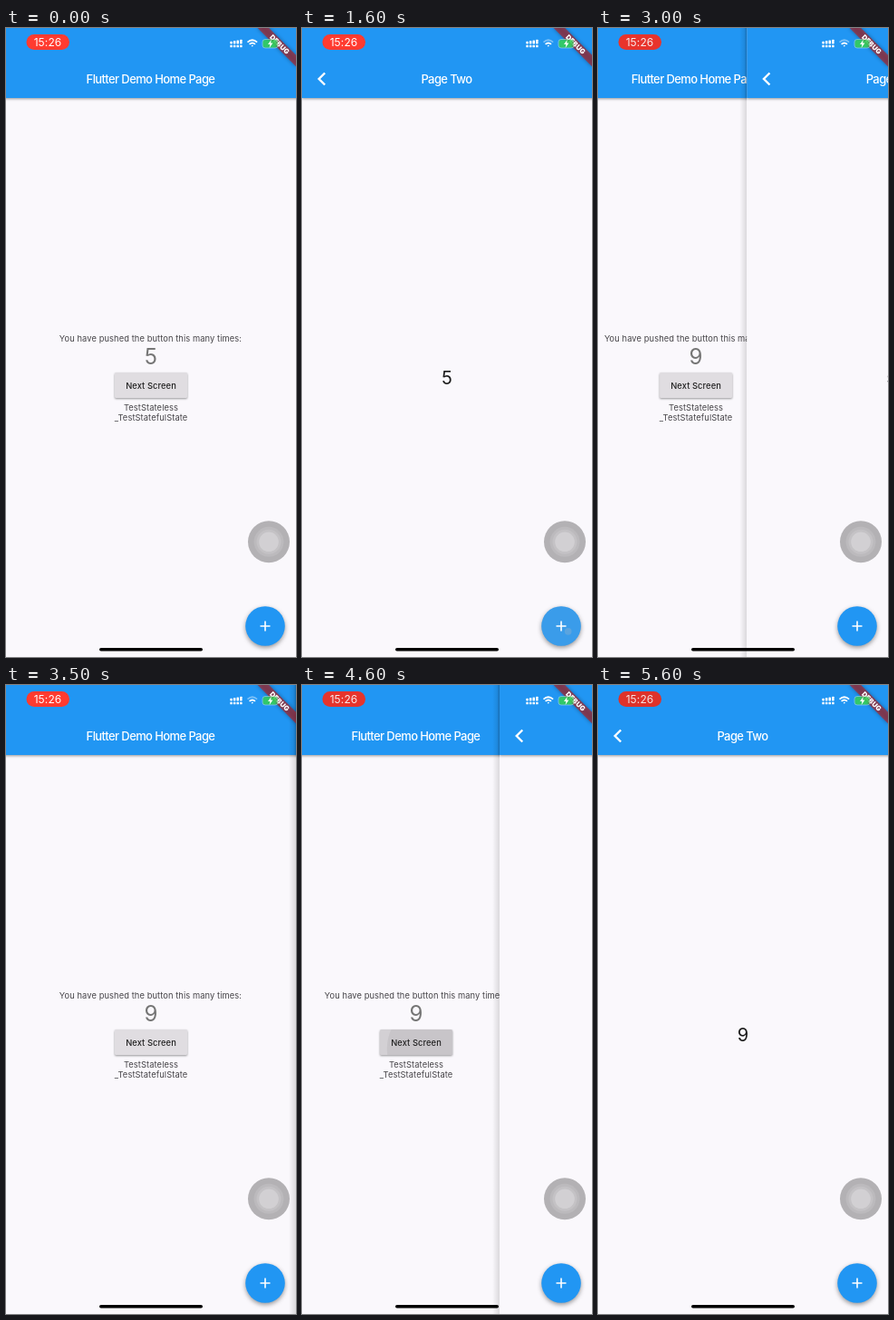
Recreate the animation shown at these times as an HTML page. Size 320 px wide and 692 px high, loop 5.7 s.

```html
<!DOCTYPE html>
<html lang="en">
<head>
<meta charset="utf-8">
<title>Counter demo</title>
<style>
html, body { margin: 0; width: 100%; height: 100%; overflow: hidden; background: #faf8fc; }
svg { display: block; width: 100vw; height: 100vh; }
text { font: 400 9.3px Inter, Roboto, sans-serif; letter-spacing: .1px; fill: #464448; text-anchor: middle; }
text.title { font-size: 13px; font-weight: 500; letter-spacing: -.6px; fill: #fff; }
text.label { font-weight: 500; fill: #222; }
text.count { font-size: 24px; fill: #757575; }
text.big { font-size: 20px; fill: #1a1a1a; }
text.clock { font-size: 12px; }
text.debug { font-size: 7.6px; font-weight: 900; fill: #fff; }
.bar { fill: #2196f3; filter: drop-shadow(0 1.5px 1.5px #0006); }
.button { fill: #e0dde1; filter: drop-shadow(0 1.2px 1px #0006); }
.fab { fill: #2196f3; filter: drop-shadow(0 2.5px 2.5px #0006); }
.banner { fill: #b71c1ca0; filter: drop-shadow(0 0 2px #0008); }
.line { fill: none; stroke: #fff; }
</style>
</head>
<body>
<svg viewBox="0 0 320 692">
  <defs>
    <clipPath id="fabClip"><circle cx="286" cy="658" r="21.8"/></clipPath>
    <clipPath id="buttonClip"><rect x="120" y="379" width="80" height="28" rx="1.5"/></clipPath>
    <linearGradient id="edge"><stop stop-color="#000" stop-opacity="0"/><stop offset="1" stop-color="#000" stop-opacity=".13"/></linearGradient>
  </defs>

  <g id="home">
    <rect width="320" height="692" fill="#faf8fc"/>
    <rect class="bar" x="-10" y="-10" width="340" height="87"/>
    <text class="title" x="159.5" y="61">Flutter Demo Home Page</text>
    <text x="159.5" y="344.5">You have pushed the button this many times:</text>
    <text class="count" id="count" x="160" y="370">5</text>
    <rect class="button" x="120" y="379" width="80" height="28" rx="1.5"/>
    <g id="ink" clip-path="url(#buttonClip)">
      <rect x="120" y="379" width="80" height="28" fill="#000" opacity=".06"/>
      <circle id="inkSpot" cx="178" cy="400" opacity=".05"/>
    </g>
    <text class="label" x="160" y="396.5">Next Screen</text>
    <text x="160" y="420.8">TestStateless</text>
    <text x="160" y="432.3">_TestStatefulState</text>
  </g>

  <g id="second">
    <rect x="-8" width="8" height="692" fill="url(#edge)"/>
    <rect width="320" height="692" fill="#faf8fc"/>
    <rect class="bar" width="330" y="-10" height="87"/>
    <path class="line" d="M25.2 49.5 18.7 56l6.5 6.5" stroke-width="2.4"/>
    <text class="title" x="159.5" y="61">Page Two</text>
    <text class="big" id="shown" x="160" y="392">5</text>
  </g>

  <circle class="fab" cx="286" cy="658" r="21.8"/>
  <g id="splashes" clip-path="url(#fabClip)"></g>
  <path class="line" d="M280.5 658h11M286 652.5v11" stroke-width="1.6"/>

  <g transform="translate(320 0) rotate(45)">
    <rect class="banner" x="-30" y="21" width="60" height="9"/>
    <text class="debug" y="28.2">DEBUG</text>
  </g>

  <rect id="pill" x="22.5" y="7" width="47.5" height="17" rx="8.5"/>
  <text class="clock" id="clock" x="46" y="19.5">15:26</text>
  <g id="signal" fill="#fff"></g>
  <g class="line" stroke-width="1.8">
    <path id="wifiOuter" d="M266.5 15.6q5.3-4.6 10.6 0"/>
    <path d="M268.6 17.9q3.2-2.7 6.4 0"/>
    <path d="M270.6 18.9h2.4l-1.2 1.9z" fill="#fff" stroke="none"/>
  </g>
  <rect x="283" y="12.5" width="17" height="9.5" rx="3" fill="#34c759" fill-opacity=".65" stroke="#fff" stroke-opacity=".35"/>
  <rect x="284" y="13.5" width="14" height="7.5" rx="2" fill="#34d058" fill-opacity=".7"/>
  <path d="M292.8 12.8 289 18h2.4l-.8 4 3.8-5.4H292z" fill="#fff"/>

  <circle cx="290" cy="565.3" r="23" fill="#b3b1b4"/>
  <circle cx="290" cy="565.3" r="16.5" fill="#bcbabd"/>
  <circle cx="290" cy="565.3" r="13.5" fill="#c4c2c5"/>
  <circle cx="290" cy="565.3" r="10.8" fill="#d2d0d3"/>
  <rect x="103" y="682" width="114" height="3.6" rx="1.8"/>
</svg>
<script>
const LOOP = 5700, STEP = 100, SLIDE = 500;
const PUSHES = [200, 4539], POP = 2900;
const TAPS = [1190, 1590, 1880, 2160];
const $ = id => document.getElementById(id);
const clamp = v => Math.max(0, Math.min(1, v));
const mix = (a, b, k) => `rgb(${a.map((v, i) => v + (b[i] - v) * k)})`;

const bezier = (a, b, s) => 3 * (1 - s) ** 2 * s * a + 3 * (1 - s) * s * s * b + s ** 3;

// cubic-bezier(.35, .91, .33, .97)
function ease(x) {
  let lo = 0, hi = 1;
  for (let i = 0; i < 24; i++) {
    const mid = (lo + hi) / 2;
    if (bezier(.35, .33, mid) < x) lo = mid; else hi = mid;
  }
  return bezier(.91, .97, lo);
}

const slide = (t, start) => ease(clamp((t - start) / SLIDE));

// How far the second page covers the first, 0 to 1
function cover(t) {
  if (t >= PUSHES[1]) return slide(t, PUSHES[1]);
  return t >= POP ? 1 - slide(t, POP) : slide(t, PUSHES[0]);
}

function splash(age) {
  if (age < 0 || age > 420) return '';
  const grow = clamp(age / 250), fade = 1 - clamp((age - 150) / 250);
  const x = 294 - 8 * grow, y = 664 - 6 * grow;
  return `<circle cx="286" cy="658" r="22" fill="#bcbcbc" opacity="${.16 * fade}"/>
    <circle cx="${x}" cy="${y}" r="${3 + 22 * grow}" fill="#bcbcbc" opacity="${.25 * fade}"/>`;
}

function draw(t) {
  const c = cover(t);
  $('home').setAttribute('transform', `translate(${-320 / 3 * c})`);
  $('second').setAttribute('transform', `translate(${320 * (1 - c)})`);
  $('second').style.display = c > 0 ? '' : 'none';

  $('count').textContent = 5 + TAPS.filter(tap => t >= tap).length;
  $('shown').textContent = t < PUSHES[1] ? 5 : 9;
  $('splashes').innerHTML = TAPS.map(tap => splash(t - tap)).join('');

  const ages = PUSHES.map(p => t - p + 100).filter(a => a >= 0 && a < 500);
  const age = ages.length ? ages[0] : 500;
  $('ink').setAttribute('opacity', 1 - clamp((age - 250) / 250));
  $('inkSpot').setAttribute('r', 10 + age / 4);

  // Recording pill pulses darker once per beat
  const away = Math.abs(t % 1285 - 590);
  const dim = away < 280 ? Math.cos(Math.PI / 2 * away / 280) ** 2 : 0;
  $('pill').setAttribute('fill', mix([255, 59, 48], [196, 42, 38], dim));
  $('clock').style.fill = mix([255, 255, 255], [236, 205, 205], dim);
  $('wifiOuter').setAttribute('opacity', t > 1400 && t < 4000 ? .4 : 1);
}

$('signal').innerHTML = [0, 1, 2, 3].map(i => {
  const x = 247.3 + i * 3.6, h = 2.6 + i * .7;
  return `<rect x="${x}" y="${17.4 - h}" width="2.5" height="${h}" rx=".6"/>
    <rect x="${x}" y="18.8" width="2.5" height="2.5" rx=".6"/>`;
}).join('');

const start = performance.now();
function tick() {
  const t = (performance.now() - start) % LOOP;
  draw(Math.floor(t / STEP) * STEP);
  requestAnimationFrame(tick);
}
tick();
</script>
</body>
</html>
```
